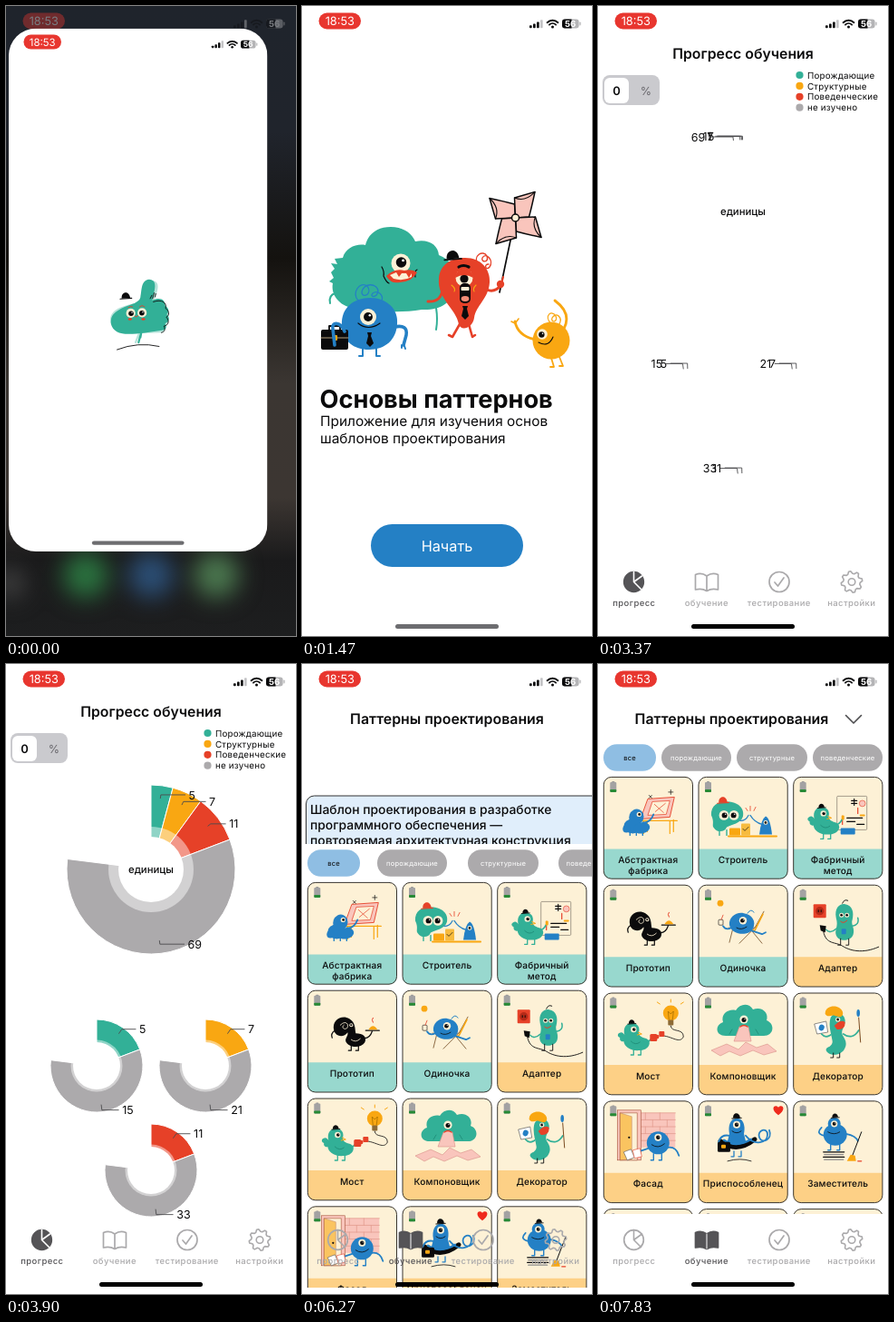
Recreate the animation shown at these times as an HTML page. Size 320x693 px, loop 8000 ms.

```html
<!DOCTYPE html>
<html lang="ru">
<head>
<meta charset="utf-8">
<style>
html, body { margin: 0; width: 100%; height: 100%; overflow: hidden; background: #fff }
svg { display: block; width: 100vw; height: 100vh }
text { font-family: Inter, "Open Sans", sans-serif; white-space: pre; text-rendering: geometricPrecision }
</style>
</head>
<body>
<svg id="stage" viewBox="0 0 320 693"></svg>
<script>
const GREEN = '#32b097', BLUE = '#2480c5', RED = '#e64128', YELLOW = '#f9a712', GRAY = '#acaaac',
  CREAM = '#fdf1d6', PINK = '#f9c5bc', INK = '#0b0b0c';

const circle = (x, y, r, f, more = '') => `<circle cx="${x}" cy="${y}" r="${r}" fill="${f}" ${more}/>`;
const oval = (x, y, rx, ry, f, a = 0) =>
  `<ellipse rx="${rx}" ry="${ry}" fill="${f}" transform="translate(${x} ${y}) rotate(${a})"/>`;
const rect = (x, y, w, h, r, f, more = '') =>
  `<rect x="${x}" y="${y}" width="${w}" height="${h}" rx="${r}" fill="${f}" ${more}/>`;
const fill = (d, f, more = '') => `<path d="${d}" fill="${f}" ${more}/>`;
const line = (d, c = INK, w = 1, f = 'none') =>
  `<path d="${d}" fill="${f}" stroke="${c}" stroke-width="${w}" stroke-linecap="round" stroke-linejoin="round"/>`;
const text = (x, y, size, s, f = INK, more = '') =>
  `<text x="${x}" y="${y}" font-size="${size}" fill="${f}" ${more}>${s}</text>`;
const group = (s, more = '') => `<g ${more}>${s}</g>`;
const at = (x, y, s) => group(s, `transform="translate(${x} ${y})"`);
const MID = 'text-anchor="middle" ', END = 'text-anchor="end" ';
const weight = n => `font-weight="${n}" `, space = n => `letter-spacing="${n}" `;
const page = s => rect(0, 0, 320, 693, 0, '#fff') + s;
const eye = (x, y, r, px = 0, py = 0) =>
  circle(x, y, r, CREAM) + circle(x + px, y + py, r * .55, INK) + circle(x + px + r * .2, y + py - r * .2, r * .14, '#fff');
const hat = (x, y, k = 1, c = INK) =>
  at(x, y, `<g transform="scale(${k}) rotate(-4)">` + fill('M-5.5 0C-6 -9 5 -10 5.5 0Z', c) + line('M-7.5 .5H7.5', c, 1.4) + '</g>');

const status =
  rect(18.5, 7.5, 46.5, 18, 9, '#e8362f') + text(41.8, 21.2, 12.8, '18:53', '#fff', MID) +
  [3, 4.6, 6.8, 9].map((h, i) => rect(251 + i * 4, 24.2 - h, 2.7, h, .8, i < 3 ? INK : '#c4c4c6')).join('') +
  line('M270.6 18.2a8.5 8.5 0 0 1 11.8 0M272.9 20.6a5.2 5.2 0 0 1 7.2 0', INK, 1.9) + circle(276.5, 23, 1.5, INK) +
  rect(287, 14.5, 18.6, 10, 3.2, '#b4b4b6') + fill('M290 14.5H297.5V24.5H290Q287 24.5 287 21.3V17.7Q287 14.5 290 14.5', INK) +
  rect(306.3, 17.6, 1.3, 3.8, .6, '#b4b4b6') + text(296.2, 23.1, 9.6, '56', '#fff', MID + weight(700));

const home = `<defs><linearGradient id="dusk" x2="0" y2="1">` +
  [[0, '#1f242c'], [.2, '#20242c'], [.4, '#14120f'], [.6, '#3b3632'], [.78, '#3c3632'], [.88, '#1a1a1b'], [1, '#1d1e1f']]
    .map(([o, c]) => `<stop offset="${o}" stop-color="${c}"/>`).join('') +
  `</linearGradient></defs>` + rect(0, 0, 320, 693, 0, 'url(#dusk)') +
  group(circle(88, 626, 25, '#2b7540') + circle(160, 626, 25, '#2c5078') + circle(232, 626, 25, '#4c7a50') +
    circle(4, 635, 16, '#444'), 'style="filter:blur(13px)"') + group(status, 'opacity=".4"');

const FINGERS = 'C190 333 196 339 194 345C199 348 199 354 195 356C199 360 198 366 192 367C194 371 193 374 189 375';
const thumb =
  line('M162 374L157 387M162 374L160 381', GREEN, 2.4) +
  fill(`M165 332C168 322 168 311 178 311C187 312 185 321 182 329L179 337${FINGERS}C170 376 148 377 138 374` +
    'C128 371 124 363 126 356C129 343 150 341 158 338C162 336 164 335 165 332Z', GREEN);
const thumbFace =
  line('M179 337' + FINGERS) + line('M175 333L177 329M178 333L180 326M181 331L182 327') +
  eye(151, 351, 5.7, .4, .4) + eye(165, 350.5, 5.7, -.3, .3) +
  line('M148 344Q151 342 153 343M162 343Q165 340 168 343M156 355Q158 357 160 354', RED, 1) +
  oval(150, 358.5, 2.5, 1.4, RED) + oval(166.5, 358.5, 2.5, 1.4, RED) + hat(145, 332.5, .95) +
  line('M134 396Q160 386 186 392');
const splash = page(group(thumb, 'id="ghost"') + group(thumb, 'id="thumb"') + thumbFace);

const pinwheel = line('M235 234L218 315', INK, 1.7) +
  at(235.5, 233, [0, 90, 180, 270].map(a => group(
    line('M0 0L-22 1L-28.5 -21.5Q-12 -18 -1 -15Z', INK, 1.5, PINK) + line('M-28.5 -21.5Q-17 -11 -22 1', INK, 1.1),
    `transform="rotate(${a})"`)).join('') + circle(0, 0, 4, CREAM, `stroke="${INK}" stroke-width="1.5"`));

const cloudFolk =
  line('M37 316Q29 318 31 327M148 332Q150 345 148 356', GREEN, 2) +
  fill('M32 293L36 289 32 283 39 284 36 278 45 277C48 266 60 261 70 263C73 250 84 243 98 243C112 243 121 250 125 259' +
    'C140 256 150 263 151 274C166 280 171 291 168 310C166 327 152 335 132 334C110 338 80 336 65 333C45 334 31 320 34 305L30 303 35 299Z', GREEN) +
  eye(109, 283, 10.5, .5, -1) + line('M88 287Q91 292 90 297Q93 304 96 305M127 290Q124 291 125 298', INK, 1.2) +
  fill('M93 297Q102 288 113 291Q121 289 127 293Q122 303 108 304Q98 306 93 297Z', RED) +
  fill('M97 296L104 293 107 298 110 294 115 294 118 299 121 294 121 298Q112 303 101 300Z', CREAM);
const blueFolk =
  line('M62 324C54 316 64 302 72 308C78 316 68 322 66 316C66 304 84 304 84 314C82 322 74 320 78 316C84 312 90 318 88 324', BLUE, 1.3) +
  fill('M44 351C43 332 57 321 75 321C94 321 107 334 105 350C104 367 92 378 74 378C57 378 45 369 44 351Z', BLUE) +
  rect(21, 356, 30, 22, 2, INK) + line('M30 356V352H42V356', INK, 1.8) + line('M21 365H51', '#c8b08a', .9) +
  rect(34, 362, 5, 6, 1, YELLOW) +
  line('M47 358C42 346 32 348 34 355L36 373M102 353Q117 350 115 362L112 373', BLUE, 3.6) +
  line('M110 373L110 376M113 374L114 377M67 376V385H63M82 376V385H86', BLUE, 2) +
  eye(73, 342, 9, 0, 0) + line('M62 349Q73 358 86 349', INK, 1.2) + fill('M72 359H77L76 363L79 371L75 375L71 371L73 363Z', INK);
const redFolk =
  line('M194 285C188 274 200 268 204 275C207 283 197 282 199 277C203 270 212 280 207 287C203 292 200 284 206 284', RED, 1.4) +
  line('M155 309Q155 326 139 325M204 312Q212 316 220 307', RED, 3) + circle(219, 306, 4.2, RED) + line('M220 306L222 298', RED, 2) +
  line('M174 350L166 364L162 362M184 350L188 364L191 362', RED, 2.6) +
  fill('M151 300C152 284 165 277 180 277C198 277 208 290 207 304C206 322 192 329 190 343C188 355 175 358 173 350C170 333 149 322 151 300Z', RED) +
  line('M173 287Q178 284 184 287', INK, 3.2) + circle(179, 299, 9.5, CREAM) + circle(179, 300, 4.6, INK) +
  fill('M169 299A10 10 0 0 1 189 299Q179 293 169 299Z', RED) +
  rect(174, 305, 12, 22, 5, INK) + rect(175.5, 309, 9, 4, 1, CREAM) + oval(180, 322, 4.4, 3, '#f28d78') +
  line('M165 307Q170 311 168 314M192 307Q188 311 190 314', YELLOW, 1.1) +
  fill('M177 330H183L182 333L184 341L180 345L176 341L178 333Z', INK) + hat(166.5, 278, 1.25);
const yellowFolk =
  line('M258 367Q238 363 235 347M289 355Q298 338 279 324', YELLOW, 2.8) +
  line('M235 349L231 347M236 348L239 344', YELLOW, 1.6) +
  line('M275 350C266 340 276 334 280 341C283 348 274 349 276 343C280 336 288 342 284 350', YELLOW, 1.3) +
  circle(275, 368, 20.5, YELLOW) + eye(265, 361, 5.8, -.6, .5) + line('M261 370Q272 376 277 364', INK, 1.1) +
  line('M275 387L278 397H274M284 386L288 396H284', YELLOW, 1.8);
const welcome = page(cloudFolk + pinwheel + blueFolk + redFolk + yellowFolk +
  text(19.6, 442, 27.2, 'Основы паттернов', INK, weight(700)) +
  text(20, 462, 15.45, 'Приложение для изучения основ') + text(20, 481, 15.45, 'шаблонов проектирования') +
  rect(76, 570, 168, 47, 23.5, BLUE) + text(160, 599.5, 16.3, 'Начать', '#fff', MID));

// Tab bar
const ring = (n, f) => Array.from({ length: n }, (_, i) => f(i)).join('');
const cog = 'M' + Array.from({ length: 32 }, (_, i) => {
  const a = (i + .5) * Math.PI / 16, r = i % 4 < 2 ? 9.2 : 11.8;
  return (280 + r * Math.sin(a)).toFixed(1) + ' ' + (633.5 - r * Math.cos(a)).toFixed(1);
}).join('L') + 'Z';
const BOOK = 'M120 627C116 624 111 624 107.5 625.5V642C111 641 116 641 120 643.5C124 641 129 641 132.5 642V625.5C129 624 124 624 120 627V643';
function tabs(sel) {
  const tone = i => i == sel ? '#555457' : '#aaa9ab', back = i => i == sel ? tone(i) : 'none';
  return circle(39.5, 633.5, 10.8, back(0), `stroke="${tone(0)}" stroke-width="1.7"`) +
    line('M39.5 622.5V633.5L48.5 627M39.5 633.5L47.5 641.5', sel ? tone(0) : '#fff', 1.6) +
    line(BOOK, tone(1), 1.7, back(1)) + (sel == 1 ? line('M120 627V643', '#fff', 1) : '') +
    circle(200, 633.5, 11, 'none', `stroke="${tone(2)}" stroke-width="1.7"`) + line('M195 634L198.5 638L205 629', tone(2), 1.7) +
    line(cog, tone(3), 1.6) + circle(280, 633.5, 3.8, 'none', `stroke="${tone(3)}" stroke-width="1.6"`) +
    ['прогресс', 'обучение', 'тестирование', 'настройки'].map((s, i) =>
      text(39.8 + i * 80, 660, 9.5, s, tone(i), MID + space(.4) + weight(500))).join('');
}

// Progress screen
const progress = page(text(160, 58, 15.8, 'Прогресс обучения', INK, MID + weight(600)) +
  rect(5, 76, 63, 33, 8, '#cacace') + rect(7, 79, 27, 28, 6, '#fff') +
  text(20.5, 97.5, 13, '0', INK, MID + weight(600)) + text(53, 97.5, 12.5, '%', '#66656a', MID) +
  [[GREEN, 'Порождающие'], [YELLOW, 'Структурные'], [RED, 'Поведенческие'], [GRAY, 'не изучено']].map(([c, s], i) =>
    circle(222.5, 76 + i * 11.9, 4.1, c) + text(231, 79.6 + i * 11.9, 9.8, s, INK, space(.2))).join('') +
  group('', 'id="charts"') + tabs(0));

function pie(cx, cy, R, hole, rim, parts, bend, arm, p) {
  const sum = parts.reduce((s, [v]) => s + v, 0), rad = a => a * Math.PI / 180;
  const spot = (a, r) => `${cx + r * Math.sin(rad(a))} ${cy - r * Math.cos(rad(a))}`;
  let from = 0, slices = '', labels = '';
  for (const [v, c] of parts) {
    const sweep = v / sum * 360, a0 = from * p, a1 = (from + sweep) * p, mid = (a0 + a1) / 2;
    from += sweep;
    if (p > 0) slices += fill(`M${cx} ${cy}L${spot(a0, R)}A${R} ${R} 0 ${+(a1 - a0 > 180)} 1 ${spot(a1, R)}Z`, c, 'stroke="#fff"');
    const side = Math.sin(rad(mid)) > 0 ? 1 : -1, [x, y] = spot(mid, R * bend).split(' ').map(Number);
    const end = x + side * arm * Math.abs(Math.cos(rad(mid)));
    labels += line(`M${spot(mid, R * .85)}L${x} ${y}H${end}`, '#4b4b4d', .9) +
      text(end + 4 * side, y + 4.6, 12.5, v, INK, side < 0 ? END : '');
  }
  return slices + circle(cx, cy, rim, '#fff', 'opacity=".45"') + circle(cx, cy, hole, '#fff') + labels;
}
const charts = p =>
  pie(160, 226, 93, 36, 47, [[5, GREEN], [7, YELLOW], [11, RED], [69, GRAY]], .89, 27, p) +
  text(160, 230, 11.4, 'единицы', INK, MID + weight(500)) +
  [[100, 442, 5, GREEN], [220, 442, 7, YELLOW], [160, 557, 11, RED]].map(([x, y, v, c]) =>
    pie(x, y, 51, 26, 28.5, [[v, c], [v * 3, GRAY]], .96, 18.5, p)).join('');

// Card pictures, each in the space of its card
const outline = c => `stroke="${c}" stroke-width=".6"`;
const bird = line('M33 61v7h-3M41 61v7h-3', GREEN, 1.3) +
  fill('M17 44C20 42 22 44 23 46C21 38 25 33 31 33C37 33 40 37 39 42C38 47 42 49 47 50C54 53 50 63 40 63C29 64 23 59 22 53C20 54 17 52 18 49C15 48 15 45 17 44Z', GREEN) +
  eye(33, 40, 3.2, .5) + line('M38 43l4 2-5 1', YELLOW, 1) + line('M30 53q5 5 10 1', '#1d8a75', .8) + hat(31, 33.5, .6);
const pics = [
  line('M44 48V62M48 48V60M73 48V62M77 47V60M41 48H81', YELLOW, 1.2) + line('M49 24L78 22L73 44L41 46Z', RED, .9, PINK) +
    line('M54 27L73 26L69 41L49 42ZM57 38L68 29M56 30L66 39', RED, .7, CREAM) +
    line('M50 20l3 3m0-3l-3 3M74 14v5m-2.5-2.5h5', INK, .7) +
    oval(36, 44, 8, 9, BLUE, 20) + oval(32, 54, 10, 8, BLUE) + oval(42, 56, 9, 6, BLUE, -10) + circle(25, 57, 4, BLUE) +
    eye(39, 41, 2.6, .4) + line('M43 50Q51 51 55 41', BLUE, 1.8) + line('M29 61v3m7-3v3m7-3v3', BLUE, 1.4),
  line('M33 65H86', YELLOW, 2) + rect(34, 56, 12, 8, 1, YELLOW) + rect(47, 51, 10, 13, 1, '#f7bb3e') + line('M49 57l2 2 4-4', INK, .7) +
    fill('M14 42C13 30 24 26 32 27C43 27 51 34 49 43C47 51 36 52 31 55C29 61 20 61 17 56C14 53 18 50 14 42Z', GREEN) +
    eye(28, 42, 5.4, .6) + eye(39, 42, 5.4, -.4) + hat(27, 28, .85, RED) +
    fill('M67 63Q69 46 74 43Q79 45 81 63Z', BLUE) + eye(74, 50, 2.4) + line('M70 52Q62 50 57 42M46 48Q52 48 55 42', BLUE, 1.2) +
    line('M57 32v5m6-4l-2 4m-9-3l2 3', RED, .8) + line('M23 59v5m8-6v6', GREEN, 1.4),
  rect(48, 21, 33, 37, 1, CREAM, outline('#6b6459')) + circle(76, 29, 3.4, PINK, outline(RED)) +
    line('M64 26h6M64 29h6M67 24v7M59 45H76M59 49H68M70 52H78', INK, 1.1) + line('M54 43v9m17-18v6', RED, 1.2) + line('M74 42h4', YELLOW, 2) +
    rect(52, 56, 16, 7, 1, BLUE) + bird + line('M43 53Q50 54 54 46', GREEN, 1.7) + rect(53, 42, 3, 5, 1, YELLOW),
  fill('M29 44C26 32 38 26 46 31C53 35 52 42 53 47C61 47 66 51 63 57C59 64 45 63 42 56C41 52 45 50 44 46C40 52 31 51 29 44Z', INK) +
    line('M36 38Q41 33 44 37Q45 43 40 42Q37 40 40 38M48 54Q53 58 58 53', CREAM, .8) + eye(48, 38, 2) +
    line('M60 52Q68 54 71 45M64 44H79', INK, 1.2) + fill('M67 43Q72 35 77 43Z', YELLOW) + line('M72 35q-2-3 0-5', RED) +
    line('M48 60v6h-3m11-6v6h-3M30 44q-5 3-3 8', INK, 1.2),
  circle(24, 20, 3.4, YELLOW) + line('M33 47H62L72 29M38 47L34 63M56 47L70 64M64 45L45 64', '#8d6b45', 1) +
    line('M37 48L62 50L71 32', YELLOW, 1.6) +
    fill('M34 44C33 35 42 29 50 31C59 32 64 40 60 48C56 56 37 56 34 44Z', BLUE) + eye(49, 39, 4.2, -.6) + line('M42 47Q47 50 53 46', INK, .8) +
    line('M36 47Q30 50 27 45M58 50L70 54L74 52', BLUE, 1.8) + rect(22, 38, 5, 6, 1, CREAM, outline(INK)) +
    line('M25 38l2-5', RED, .8) + line('M54 31q4-6 7-1', BLUE, 1),
  rect(22, 21, 14, 15, 1, RED) + circle(29, 28.5, 4.6, '#b52a18') + line('M27.5 27.5v2m3-2v2', INK, 1) +
    fill('M47 36C45 25 51 20 57 21C65 22 67 30 65 38C63 43 68 47 66 54C64 62 50 63 47 55C45 49 50 46 47 36Z', GREEN) +
    eye(53, 33, 2.5) + eye(59, 33, 2.5) + line('M52 40Q55 43 59 39', RED, 1) + line('M54 20q2-5 6-3', INK, .9) + rect(53, 48, 5, 6, 1, BLUE) +
    line('M47 48Q41 54 36 49M65 45Q73 44 71 36', GREEN, 1.5) +
    fill('M29 44l7 1-1 7-5-2z', INK) + line('M33 51C36 66 46 62 54 67S76 76 94 68M52 59v7h-3m12-7v7h-3', INK, .9),
  bird + line('M45 53Q50 54 53 50', GREEN, 1.7) + circle(74, 22, 8.5, YELLOW) + rect(71, 29.5, 6, 6, 1, '#8d6b36') +
    line('M72 29L71 20L74 23L77 20L76 29', '#a66f00', .8) + line('M74 36C74 44 88 38 88 48C84 56 76 48 66 47', INK, .8) +
    rect(51, 45, 8, 8, 1.5, RED) + circle(59, 48, 2.2, RED) + rect(61, 42, 6, 6, 1, RED) + line('M62 12l-3-2m29 0l-3 2M74 10v-3', YELLOW, 1),
  fill('M30 47C18 47 18 35 27 32C24 22 34 17 41 19C46 11 56 11 60 18C70 14 78 22 75 30C85 34 83 47 72 47Z', GREEN) +
    eye(50, 29, 4.6, 0, .5) + fill('M45 37Q50 34 55 37L58 53H39Z', PINK, outline('#d98f86')) +
    fill('M14 63L31 56L44 62L52 54L64 60L76 56L86 64L72 68L60 63L46 69L34 64L24 69Z', PINK, outline('#d98f86')) +
    line('M46 37q4-3 8 0', RED, 1.3) + line('M37 40l-3 5m29-5l3 5', '#1d8a75', .8),
  fill('M41 27C45 19 56 21 57 30C57 38 52 40 54 46C57 51 60 55 56 62C51 70 38 69 36 63C35 59 43 60 43 53C42 46 38 36 41 27Z', GREEN) +
    fill('M35 23C34 14 49 11 54 20C56 25 52 28 46 25C42 23 38 28 35 23Z', YELLOW) + fill('M45 36Q52 28 57 32Q57 41 48 40Z', RED) + eye(49, 29, 2.6) +
    fill('M23 34L36 31L38 43L26 45Z', '#fff', outline('#444')) + oval(31, 38, 3, 3.4, BLUE, 20) +
    line('M55 45Q65 52 72 41M41 46Q35 50 31 45', GREEN, 1.7) + line('M72 27L74 54', '#7a4a20', 1) + oval(71.5, 22, 1.8, 4, BLUE) +
    line('M44 66v5h-3m10-5v5h-3', INK, .9),
  rect(40, 13, 39, 38, 0, PINK) +
    ring(5, i => line(`M40 ${13 + i * 7.6}H79` + (i < 4 ? `M${46 + i % 2 * 8} ${13 + i * 7.6}v7.6m16-7.6v7.6` : ''), '#e39c90', .8)) +
    rect(15, 10, 26, 55, 0, PINK, outline('#a5523a')) + fill('M18 13H37V65H18Z', CREAM, outline('#a5523a')) +
    fill('M18 13L31 17V64L18 65Z', YELLOW, outline('#a5523a') + ' opacity=".6"') + circle(28, 40, 1.1, INK) +
    circle(60, 46, 12.5, BLUE) + eye(60, 40, 4) + line('M53 48Q60 53 67 47', INK, .8) + line('M49 52L40 55M71 51Q80 50 83 60', BLUE, 1.8) +
    fill('M22 56l8-3 4 9-8 3z', '#fff', outline('#555')) + fill('M32 54l8-2 2 9-8 2z', '#fff', outline(RED)) + line('M55 58v7h-3m12-7v7h-3', BLUE, 1.4),
  fill('M34 36C32 26 36 19 42 19C49 19 52 26 50 36L53 48H31Z', BLUE) + eye(42, 26, 4) + line('M37 33q5 4 10 0', INK, .8) + hat(42, 18.5, .7) +
    line('M24 44Q42 58 62 42', INK, 5) + line('M28 43Q42 52 58 42', BLUE, 2.4) +
    line('M52 38C62 50 76 46 76 37S64 32 67 40S82 42 78 32', BLUE, 1.8) + line('M34 38Q24 36 22 46', BLUE, 1.8) +
    rect(21, 45, 14, 11, 1.5, INK) + rect(25, 48, 5, 4, 1, YELLOW) + line('M39 55v6h-3m11-6v6h-3', BLUE, 1.3) +
    line('M32 66Q46 62 58 66', INK, .8) +
    fill('M88 15.5C78 8.5 84 2.5 88 7C92 2.5 98 8.5 88 15.5Z', '#ef2a1c'),
  oval(46, 37, 13, 12, BLUE) + oval(45, 25, 7, 7, BLUE) + eye(45, 25, 3.6) + line('M38 34q7 4 13 0', INK, .8) + hat(46, 18, .6) +
    line('M34 38Q24 36 31 29M58 36Q69 38 71 44', BLUE, 1.7) + line('M41 48v6h-3m13-6v6h-3', BLUE, 1.4) +
    ring(4, i => line(`M${33 + i % 2} ${56 + i * 2.8}H${56 - i % 2}`, i % 2 ? '#8a8a8a' : INK, 1.2)) +
    line('M75 34L65 60', INK, 1) + fill('M63 59l5 1 1 6H59z', YELLOW) + line('M71 66h4', RED, 1.2)
];
const names = ['Абстрактная|фабрика', 'Строитель', 'Фабричный|метод', 'Прототип', 'Одиночка', 'Адаптер', 'Мост', 'Компоновщик',
  'Декоратор', 'Фасад', 'Приспособленец', 'Заместитель', '', '', ''];
const cards = names.map((name, i) => {
  const band = i < 5 ? '#98d8ce' : '#fdd086';
  return at([6.3, 111, 215.7][i % 3], 124.4 + (i / 3 | 0) * 118.8,
    rect(0, 0, 98.2, 111.8, 8.5, CREAM) + fill('M0 79H98.2V103.5Q98.2 111.8 89.7 111.8H8.5Q0 111.8 0 103.5Z', band) +
    rect(9, 4.6, 3, 2, .5, '#999') + rect(7, 5.5, 7, 11, 1, '#a3a2a3') + rect(7, 13.5, 7, 3, .8, '#278a35') +
    (pics[i] || '') + rect(0, 0, 98.2, 111.8, 8.5, 'none', 'stroke="#38352f"') +
    name.split('|').map((s, k) => text(49, 94.5 + k * 11.8, 10.1, s, INK, MID + space(.18) + weight(550))).join(''));
}).join('');
const chips = [['все', 6, 6, 58], ['порождающие', 83, 70, 77], ['структурные', 183, 153, 78], ['поведенческие', 283, 237, 77]];
const chip = ([s, , , w], i) => group(rect(0, 0, w, 29.5, 14.75, i ? GRAY : '#8fbee3') +
  text(w / 2, 17.6, 7.6, s, i ? '#fff' : INK, MID + space(.2)), 'class="chip"');
const about = rect(4.5, 145, 340, 90, 9, '#e0eefb', 'stroke="#333"') +
  ['Шаблон проектирования в разработке', 'программного обеспечения —', 'повторяемая архитектурная конструкция']
    .map((s, i) => text(9, 165 + i * 17.2, 13.9, s, INK, weight(500))).join('');
const learn = page(`<clipPath id="fold"><rect id="foldBox" y="144" width="320" height="54"/></clipPath>` +
  text(160, 66, 15.9, 'Паттерны проектирования', INK, 'id="heading" ' + MID + weight(600)) +
  group(line('M273.5 56.5L282 65L290.5 56.5', '#4b4b4d', 1.6), 'id="chevron"') +
  group(about, 'clip-path="url(#fold)"') + group(chips.map(chip).join('') + cards, 'id="list"') +
  rect(0, 605, 320, 88, 0, '#fff', 'id="tabBack"') + rect(0, 686, 320, 7, 0, '#fff') + tabs(1));

const $ = id => document.getElementById(id);
$('stage').innerHTML = home + `<clipPath id="frame"><rect id="frameBox" width="320"/></clipPath>` +
  group(group(splash) + group(welcome, 'id="welcome"') + group(progress, 'id="progress"') + group(learn, 'id="learn"') +
    status + rect(103, 0, 114, 5, 2.5, INK, 'id="bar"'), 'id="app" clip-path="url(#frame)"');
const chipNodes = document.querySelectorAll('.chip');
const set = (id, o) => { for (const k in o) $(id).setAttribute(k, o[k]); };
const ramp = (t, from, span) => Math.min(1, Math.max(0, (t - from) / span));
const mix = (a, b, k) => a + (b - a) * k;

function draw(t) {
  // The app window grows out of the home screen
  const k = t < 750 ? Math.exp(-t / 110) * (1 - t / 750) : 0, scale = 1 - .109 * k, h = (693 - 119 * k) / scale;
  set('app', { transform: `translate(${3 * k} ${25 * k}) scale(${scale})` });
  set('frameBox', { height: h, rx: 34 * k });
  set('bar', { y: h - 13, fill: t < 2700 ? '#6d6d70' : '#000' });
  set('thumb', { transform: `rotate(${-6 * k} 160 352)` });
  set('ghost', { opacity: .35 * k });

  set('welcome', { opacity: ramp(t, 1250, 180) });
  set('progress', { opacity: ramp(t, 2560, 300) });
  const u = ramp(t, 2480, 1500);
  $('charts').innerHTML = charts(u * u * (2.70158 * u - 1.70158));

  // The description folds away and the list moves up
  const s = ramp(t, 6280, 400), e = s * s * (3 - 2 * s), drop = 116 * (1 - e);
  set('learn', { visibility: t < 6130 ? 'hidden' : 'visible' });
  set('foldBox', { height: Math.max(0, drop - 62) });
  set('heading', { x: mix(160, 147.5, e) });
  set('chevron', { opacity: e });
  set('list', { transform: `translate(0 ${drop})` });
  set('tabBack', { opacity: ramp(t, 6290, 80) });
  chipNodes.forEach((c, i) => c.setAttribute('transform', `translate(${mix(chips[i][1], chips[i][2], e)} 88.3)`));
}
const start = performance.now();
(function tick() {
  draw((performance.now() - start) % 8000);
  requestAnimationFrame(tick);
})();
</script>
</body>
</html>
```
